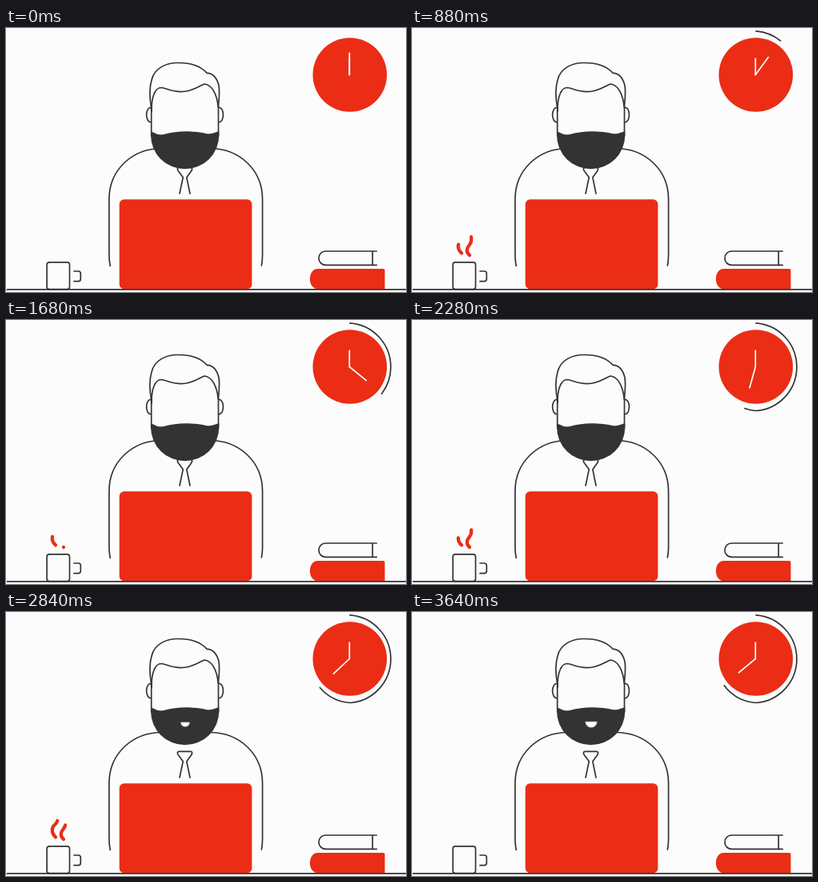
An HTML page that plays this animation: 500x330 px, repeating every 4000 ms.

```html
<!DOCTYPE html>
<html lang="en">
<head>
<meta charset="utf-8">
<title>Desk clock</title>
<style>
  html, body { margin: 0; width: 100%; height: 100%; overflow: hidden; background: #fcfcfc; }
  svg { display: block; width: 500px; height: 330px; }
  .line { fill: none; stroke: #333; stroke-width: 1.7; stroke-linecap: round; stroke-linejoin: round; }
  .paper { fill: #fcfcfc; }
  .red { fill: #eb2d15; }
  .hand { stroke: #fff; stroke-width: 1.7; stroke-linecap: round; }
  .steam, .ray { fill: none; stroke: #eb2d15; stroke-linecap: round; stroke-linejoin: round; }
  .steam { stroke-width: 4.2; }
  .ray { stroke-width: 2; }
</style>
</head>
<body>
<svg viewBox="0 0 500 330">
  <!-- clock -->
  <circle class="red" cx="429.8" cy="58.5" r="46.3"/>
  <path class="hand" d="M429.3 58.5V38"/>
  <path class="hand" id="hour" d="M429.3 58.5V31.3"/>
  <path class="line" id="arc" d="M430 3.8A55 55 0 0 1 430 113.5A55 55 0 0 1 430 3.8"/>
  <path class="ray" id="rayA" d="M367 85.8L349.8 93.2"/>
  <path class="ray" id="rayB" d="M381 108.5L373 117.7"/>

  <!-- body and tie -->
  <path class="line" d="M130.3 297.5Q128.9 291 128.9 283V214C128.9 178 157 150.5 195 150.5H254.5C292.5 150.5 320.6 178 320.6 214V283Q320.6 291 319.4 296.8"/>
  <path class="line" d="M217 207L221.3 186.8L215.2 178.5C213.8 176.5 214 174.3 216.5 174.3H230.5C233 174.3 233.2 176.5 231.8 178.5L225.9 186.8L230 207"/>

  <!-- head -->
  <g id="head">
    <path class="line paper" d="M182 99.5C173.5 98 173.500 119 182 117.700M265.500 99.500C273.500 98 273.500 119 265.500 117.700"/>
    <path class="line paper" d="M181.700 135V100C179 85 179 75 182 65C185.500 50 200 43.500 215 43.500C232 43.500 244 48 251 56.300C258.500 56 264 63 266 72C267.500 81 266 90 265.500 98V135Z"/>
    <path class="line" d="M182 104C181.500 86 186.500 74.500 194 74.500C200 75 206 79.600 219 79.600C233 79.600 240 73 248 70C257 70.500 264 83 265.200 99"/>
    <path fill="#333" d="M181 129C186 131 190 134.500 197 133C207 130.300 215 129.200 224 129.200C234 129.200 245 130.500 252 132.200C257 132.700 262 130.300 266.300 129V134A42.650 42.300 0 0 1 181 134Z"/>
    <path id="mouth" fill="#fcfcfc" stroke="#888" stroke-width=".7" d="M-7.300 -3.500H7.300C7 6.300 -7 6.300 -7.300 -3.500Z"/>
  </g>

  <!-- desk -->
  <rect class="red" x="141.700" y="214.200" width="165.700" height="112" rx="6"/>
  <rect class="line" x="51.100" y="292.900" width="28.400" height="33.700" rx="3"/>
  <path class="line" d="M85 304H90.500Q93.300 304 93.300 307V313.500Q93.300 316.700 90.500 316.700H85"/>
  <path class="line" d="M463.200 279H400C388 279 388 296.400 400 296.400H463.200M458.200 279V296.400"/>
  <path class="red" d="M390 301H471.800Q473.500 301 473.500 302.700V326.300H390C376.500 326.300 376.500 301 390 301Z"/>
  <path class="line" d="M1.500 326.900H500"/>
  <path class="steam" id="steamL" d="M62 281.300C57 277 56.800 271 59.500 267.500C61.500 265.500 63.500 264 64.300 261"/>
  <path class="steam" id="steamR" d="M72 284C67 280 68.500 275 71.800 271C74.500 268 74.500 265 74 261.200"/>
</svg>
<script>
const LOOP = 4000;
const $ = id => document.getElementById(id);

// Ease-in-out curve (.42, 0, .58, 1)
function ease(x) {
  let lo = 0, hi = 1, s = 0.5;
  for (let i = 0; i < 24; i++) {
    s = (lo + hi) / 2;
    const at = 1.26 * s * (1 - s) ** 2 + 1.74 * s * s * (1 - s) + s ** 3;
    if (at < x) lo = s; else hi = s;
  }
  return s * s * (3 - 2 * s);
}

// Eased 0 to 1 between two times
const ramp = (t, from, to) =>
  t <= from ? 0 : t >= to ? 1 : ease((t - from) / (to - from));

// Each cycle: grow from, grow to, shrink from, shrink to
const puffs = {
  steamL: [[660, 1100, 1460, 1900], [2085, 2515, 3000, 3430]],
  steamR: [[420, 860, 1260, 1700], [1900, 2350, 2700, 3145]]
};
const rays = { rayA: [2840, 3080, 3150, 3440], rayB: [2860, 3080, 3150, 3440] };

const lengths = {};
for (const id of ['arc', 'rayA', 'rayB', 'steamL', 'steamR'])
  lengths[id] = $(id).getTotalLength();

// Show only the part of a path between two fractions
function trim(id, start, end) {
  const el = $(id), len = lengths[id];
  el.style.visibility = end - start > 0.002 ? 'visible' : 'hidden';
  el.style.strokeDasharray = `${(end - start) * len} ${len * 2}`;
  el.style.strokeDashoffset = -start * len;
}

function draw(t) {
  const turn = 230.5 * ramp(t, 30, 3115);
  $('hour').setAttribute('transform', `rotate(${turn} 429.3 58.5)`);
  trim('arc', 0, turn / 360);

  $('head').setAttribute('transform', `translate(0 ${-10 * ramp(t, 2400, 2840)})`);
  const smile = ramp(t, 2680, 2920);
  $('mouth').setAttribute('transform', `translate(224 150.5) scale(${smile})`);
  $('mouth').style.visibility = smile > 0 ? 'visible' : 'hidden';

  for (const id in puffs) {
    const shown = puffs[id].reduce((sum, [a, b, c, d]) => sum + ramp(t, a, b) - ramp(t, c, d), 0);
    trim(id, 0, shown);
  }
  for (const id in rays) {
    const [a, b, c, d] = rays[id];
    trim(id, ramp(t, c, d), ramp(t, a, b));
  }
}

const begin = performance.now();
function tick() {
  draw((performance.now() - begin) % LOOP);
  requestAnimationFrame(tick);
}
tick();
</script>
</body>
</html>
```
